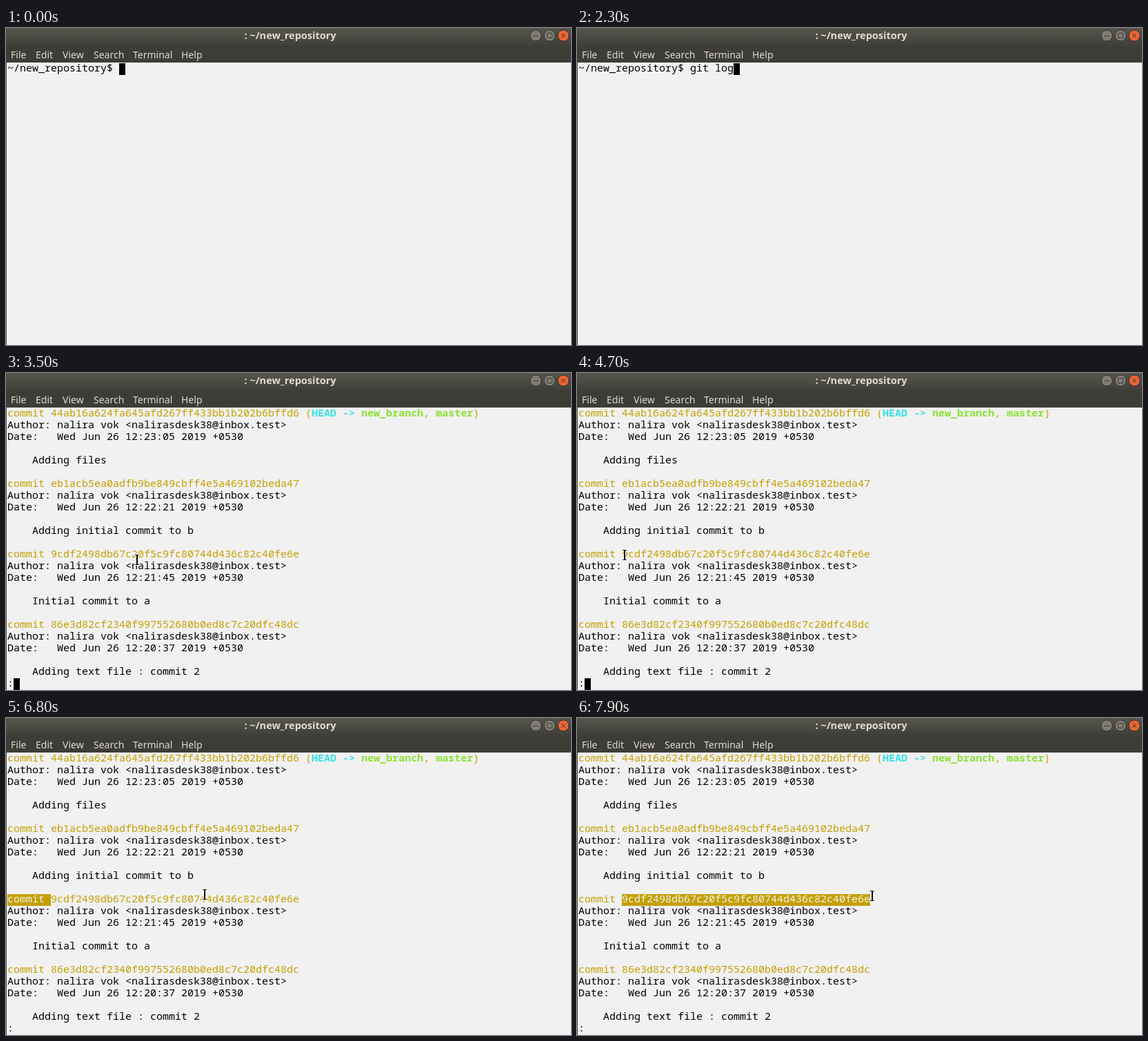
These frames come from a looping animation (819x459 px, 8 s). An HTML page:

```html
<!DOCTYPE html>
<html lang="en">
<head>
<meta charset="utf-8">
<title>Terminal</title>
<style>
  html, body { margin: 0; width: 100%; height: 100%; overflow: hidden; background: #f1f1f1; }
  svg { display: block; width: 819px; height: 459px; }
  text { white-space: pre; }
  .bar { font: 14px "Noto Sans", "Open Sans", sans-serif; fill: #dfdbd2; }
  .title { font-size: 14.5px; font-weight: 700; text-anchor: middle; }
  .term { font: 15px "Noto Sans Mono", "DejaVu Sans Mono", monospace; fill: #000; }
  .hash { fill: #c4a000; }
  .head { fill: #34e2e2; font-weight: 700; }
  .branch { fill: #8ae234; font-weight: 700; }
  .picked { fill: #f1f1f1; }
  .buttons { fill: #7f7d75; stroke: #33322d; }
  .buttons .close { fill: #ee6534; }
  .glyph { fill: none; stroke: #3a3934; }
</style>
</head>
<body>
<svg viewBox="0 0 819 459">
  <defs>
    <linearGradient id="shade" x2="0" y2="1">
      <stop offset="0" stop-color="#58574e"/>
      <stop offset="1" stop-color="#3d3c37"/>
    </linearGradient>
    <clipPath id="selection"><rect id="range" y="255" height="17"/></clipPath>
  </defs>

  <rect width="819" height="459" fill="#f1f1f1"/>
  <rect width="819" height="50" fill="#3d3c37"/>
  <rect width="819" height="27" fill="url(#shade)"/>
  <rect y="50" width="1" height="409" fill="#45443f"/>

  <g class="bar">
    <text class="title" x="412" y="16">: ~/new_repository</text>
    <text x="7" y="44">File</text>
    <text x="43" y="44">Edit</text>
    <text x="82" y="44">View</text>
    <text x="127" y="44">Search</text>
    <text x="184" y="44">Terminal</text>
    <text x="254" y="44">Help</text>
  </g>
  <g class="buttons">
    <circle cx="768" cy="11" r="8"/>
    <circle cx="788" cy="11" r="8"/>
    <circle class="close" cx="808" cy="11" r="8"/>
  </g>
  <path class="glyph" d="M764 11.5h8M784.5 7.5h7v7h-7zM805 8l6 6m0-6l-6 6"/>

  <g class="term">
    <text id="prompt" x="2" y="63"></text>
    <g id="log"></g>
    <g clip-path="url(#selection)">
      <rect x="2" y="255" width="423" height="17" fill="#c4a000"/>
      <rect x="425" y="255" width="394" height="17"/>
      <text id="pickedLine" class="picked" x="2"></text>
    </g>
  </g>
  <rect id="cursor" width="9" height="17"/>

  <g id="pointer">
    <path d="M-4-8.5h8v3h-2.2v11h2.2v3h-8v-3h2.2v-11h-2.2z" fill="#fff"/>
    <path d="M-3-7.5h6v1h-2v13h2v1h-6v-1h2v-13h-2z"/>
  </g>
</svg>
<script>
const LOOP = 8000, TICK = 100;
const CELL = 9, ROW = 17, LEFT = 2, TOP = 51, RIGHT = 819;
const TYPE_START = 800, LOG_START = 2500;
const POINTER_START = 3300, DRAG_START = 6400, DRAG_END = 7800;
const BLINK = 580, BLINK_START = 2340;
const PROMPT = '~/new_repository$ ';
const PICKED_ROW = 12;

const commits = [
  ['44ab16a624fa645afd267ff433bb1b202b6bffd6', '12:23:05', 'Adding files'],
  ['eb1acb5ea0adfb9be849cbff4e5a469102beda47', '12:22:21', 'Adding initial commit to b'],
  ['9cdf2498db67c20f5c9fc80744d436c82c40fe6e', '12:21:45', 'Initial commit to a'],
  ['86e3d82cf2340f997552680b0ed8c7c20dfc48dc', '12:20:37', 'Adding text file : commit 2']
];

const words = [
  { text: 'git ', start: TYPE_START, pace: 150 },
  { text: 'log', start: 1900, pace: 180 }
];

const glides = [
  { start: 3300, end: 3500, x: 190, y: 270.5 },
  { start: 3700, end: 4100, x: 68, y: 246.5 },
  { start: 4300, end: 4700, x: 69, y: 263.5 },
  { start: 6200, end: 6500, x: 174, y: 253.5 },
  { start: 6500, end: 7100, x: 402, y: 257.5 },
  { start: 7200, end: 7300, x: 437, y: 257.5 },
  { start: 7700, end: 7900, x: 428, y: 257.5 }
];

const $ = id => document.getElementById(id);
const clamp = (value, low, high) => Math.min(high, Math.max(low, value));
const cellX = column => LEFT + CELL * column;
const rowY = row => TOP + ROW * row;
const baseline = row => rowY(row) + 12;
const span = (style, text) => `<tspan class="${style}">${text}</tspan>`;

function setAttrs(node, attrs) {
  for (const name in attrs) node.setAttribute(name, attrs[name]);
}

function buildLog() {
  const line = (row, text, style = '') =>
    `<text class="${style}" x="${LEFT}" y="${baseline(row)}">${text}</text>`;
  const refs = ' (' + span('head', 'HEAD -&gt; ') + span('branch', 'new_branch') +
    ', ' + span('branch', 'master') + ')';

  $('log').innerHTML = commits.map(([hash, time, message], i) => {
    const row = i * 6;
    return line(row, 'commit ' + hash + (i ? '' : refs), 'hash') +
      line(row + 1, 'Author: nalira vok &lt;nalirasdesk38@inbox.test&gt;') +
      line(row + 2, `Date:   Wed Jun 26 ${time} 2019 +0530`) +
      line(row + 4, '    ' + message);
  }).join('') + line(23, ':');

  $('pickedLine').textContent = 'commit ' + commits[2][0];
  setAttrs($('pickedLine'), { y: baseline(PICKED_ROW) });
}

function typedAt(t) {
  return words.map(({ text, start, pace }) =>
    text.slice(0, clamp(Math.floor((t - start) / pace) + 1, 0, text.length))).join('');
}

// Blinks when idle and stays solid while typing
function cursorShown(t) {
  const idle = t < TYPE_START ? t + BLINK - 300 : Math.max(0, t - BLINK_START);
  return Math.floor(idle / BLINK) % 2 === 0;
}

function pointerAt(t) {
  return glides.reduce((from, { start, end, x, y }) => {
    const p = clamp((t - start) / (end - start), 0, 1);
    return { x: from.x + (x - from.x) * p, y: from.y + (y - from.y) * p };
  }, { x: 277, y: 66.5 });
}

// The drag is anchored at the hash: above its row it selects back to the line start
function selectionAt(t, pointerY) {
  const anchor = cellX(7);
  if (t < DRAG_START) return [anchor, anchor];
  if (pointerY < rowY(PICKED_ROW) + 2) return [LEFT, anchor];
  return [anchor, t < DRAG_END ? RIGHT : cellX(47)];
}

function render(t) {
  const paging = t >= LOG_START;
  const command = PROMPT + typedAt(t);
  $('prompt').textContent = paging ? '' : command;
  $('log').style.display = paging ? '' : 'none';

  setAttrs($('cursor'), {
    x: cellX(paging ? 1 : command.length),
    y: rowY(paging ? 23 : 0),
    visibility: cursorShown(t) ? 'visible' : 'hidden'
  });

  const { x, y } = pointerAt(t);
  setAttrs($('pointer'), {
    transform: `translate(${x} ${y})`,
    visibility: t < POINTER_START ? 'hidden' : 'visible'
  });

  const [from, to] = selectionAt(t, y);
  setAttrs($('range'), { x: from, width: to - from });
}

function tick(now) {
  render(Math.floor(now % LOOP / TICK) * TICK);
  requestAnimationFrame(tick);
}

buildLog();
render(0);
requestAnimationFrame(tick);
</script>
</body>
</html>
```
